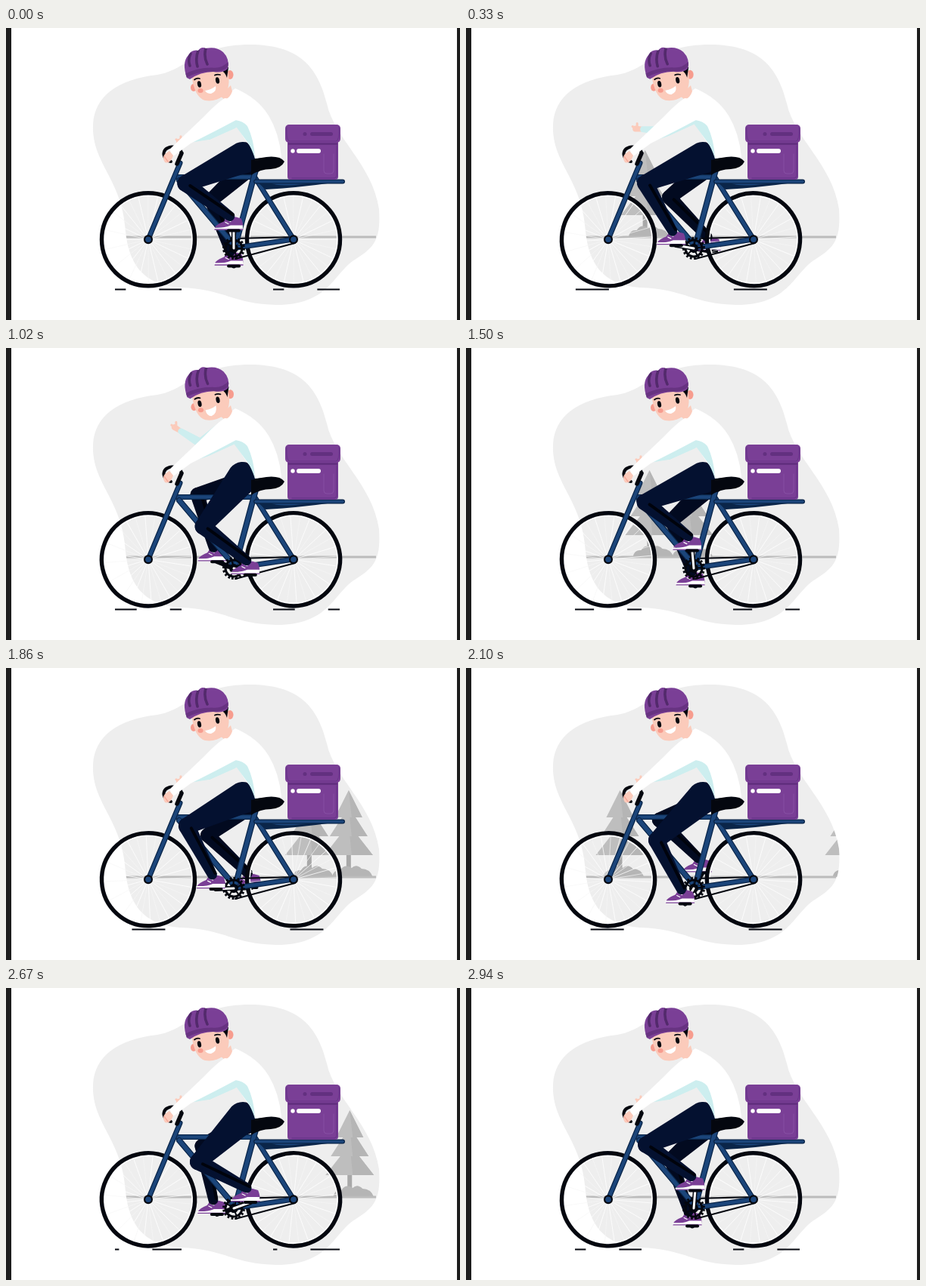
An HTML page with a canvas for the animation above (2.97 s loop, 600x387 px).

```html
<!DOCTYPE html>
<html lang="en">
<head>
<meta charset="utf-8">
<title>Delivery cyclist</title>
<style>
html, body { margin: 0; width: 100%; height: 100%; overflow: hidden; background: #fff; }
canvas { display: block; }
</style>
</head>
<body>
<canvas id="stage" width="600" height="387"></canvas>
<script>
const c = document.getElementById('stage').getContext('2d');
const LOOP = 2970, TURN = 1480, TAU = Math.PI * 2;
const INK = '#04070f', NAVY = '#0a2549', BLUE = '#1b457a', PURPLE = '#7a3f96', PLUM = '#532a6c';
const SKIN = '#fbcbbb', CORAL = '#f79c8e', MINT = '#cdeeef', NEAR = '#041130', FAR = '#020a20', SHADE = '#00030c';
const CRANK = { x: 301, y: 292 }, AXLE = 280.3;
const blob = new Path2D('M115 128C117 90 148 68 200 62C238 56 252 22 322 22C388 22 412 52 424 100' +
  'C434 147 484 180 493 240C496 285 484 292 458 309C432 328 425 367 358 367' +
  'C300 366 290 346 230 344C175 340 162 305 158 270C154 200 113 180 115 128Z');

const mix = (a, b, k) => a + (b - a) * k;
const mixPt = (a, b, k) => ({ x: mix(a.x, b.x, k), y: mix(a.y, b.y, k) });
const smooth = (a, b, t) => {
  const k = Math.min(1, Math.max(0, (t - a) / (b - a)));
  return k * k * (3 - 2 * k);
};

function shape(d, color) {
  c.fillStyle = color;
  c.fill(new Path2D(d));
}
function stroke(d, color, width, cap = 'round') {
  c.strokeStyle = color;
  c.lineWidth = width;
  c.lineCap = cap;
  c.lineJoin = 'round';
  c.stroke(new Path2D(d));
}
function oval(x, y, rx, ry, color, turn = 0) {
  c.fillStyle = color;
  c.beginPath();
  c.ellipse(x, y, rx, ry, turn, 0, TAU);
  c.fill();
}
function box(x, y, w, h, r, color) {
  c.fillStyle = color;
  c.beginPath();
  c.roundRect(x, y, w, h, r);
  c.fill();
}
function tube(d, width) {
  stroke(d, NAVY, width);
  stroke(d, BLUE, width - 2.5);
}
// Tapered capsule between two joints
function limb(a, b, ra, rb, color) {
  const t = Math.atan2(b.y - a.y, b.x - a.x);
  c.fillStyle = color;
  c.beginPath();
  c.arc(a.x, a.y, ra, t + Math.PI / 2, t - Math.PI / 2);
  c.arc(b.x, b.y, rb, t - Math.PI / 2, t + Math.PI / 2);
  c.fill();
}

function tree(x) {
  c.save();
  c.translate(x, 0);
  box(-3, 244, 6, 33, 0, '#a8a8a8');
  for (const [top, base, half] of [[207, 248, 32], [184, 223, 25], [162, 198, 18]]) {
    shape(`M0 ${top}L${half} ${base}H${-half}Z`, '#bebebe');
    shape(`M0 ${top}L${half} ${base}H4Z`, '#b5b5b5');
  }
  shape('M-22 277Q-20 267 -11 268Q-5 259 4 265Q10 259 17 266Q28 266 32 277Z', '#b5b5b5');
  c.restore();
}

function scenery(t) {
  c.fillStyle = '#eee';
  c.fill(blob);
  c.save();
  c.clip(blob);
  for (const start of [91, -418, -366, -721]) {
    const x = start + 0.44 * t;
    if (x > 90 && x < 540) tree(x);
  }
  stroke('M155 277H489', '#bcbcbc', 3, 'butt');
  c.restore();

  const shift = (58 + t / 245 * 88) % 88;
  for (const left of [144, 353]) {
    c.save();
    c.beginPath();
    c.rect(left, 340, 88, 12);
    c.clip();
    for (const x of [left + shift, left + shift - 88]) stroke(`M${x} 346.5h44`, INK, 1.8, 'butt');
    c.restore();
  }
}

function wheel(x, turn) {
  c.save();
  c.translate(x, AXLE);
  c.rotate(-turn);
  for (let i = 0; i < 28; i++) {
    c.rotate(TAU / 28);
    stroke('M7 0H57', i % 2 ? '#ffffffd0' : '#f6f6f6b0', 0.9);
  }
  c.lineWidth = 2;
  c.strokeStyle = '#fff';
  c.beginPath();
  c.arc(0, 0, 58, 0, TAU);
  c.stroke();
  c.lineWidth = 5.4;
  c.strokeStyle = INK;
  c.beginPath();
  c.arc(0, 0, 61.5, 0, TAU);
  c.stroke();
  c.restore();
}

function pedalAt(turn) {
  return { x: CRANK.x - 23.5 * Math.sin(turn), y: CRANK.y - 23.5 * Math.cos(turn) };
}

function leg(pedal, hip, near) {
  const ankle = { x: pedal.x - 5, y: pedal.y - 19 };
  const dx = ankle.x - hip.x, dy = ankle.y - hip.y, d = Math.hypot(dx, dy);
  const thigh = 83, shin = 73;
  const along = (thigh * thigh - shin * shin + d * d) / (2 * d);
  const out = Math.sqrt(Math.max(0, thigh * thigh - along * along));
  const knee = {
    x: hip.x + (dx * along - dy * out) / d,
    y: hip.y + (dy * along + dx * out) / d
  };
  const color = near ? NEAR : FAR;
  c.save();
  c.translate(pedal.x, pedal.y);
  shape('M-25 -4Q-23 -8 -13 -12L-9 -18H3L10 -16Q13 -9 12 -4H-25Z', PURPLE);
  shape('M-26 -4Q-14 -3 -4 -7L12 -7L12 -1H-24Q-27 -1 -26 -4Z', '#fff');
  stroke('M-25 -1.5H12', PURPLE, 1.3);
  stroke('M-11 -11l4 2m-1 -5l4 2', '#fff', 1.2);
  box(-9, -2, 18, 4, 2, INK);
  c.restore();
  limb(knee, ankle, near ? 11 : 9.5, 6.5, color);
  limb(hip, knee, near ? 21 : 15, near ? 11 : 9.5, color);
  stroke(`M${knee.x + 6} ${knee.y + 3}L${ankle.x + 4} ${ankle.y - 2}`, SHADE, 4);
}

function crankArm(p, near) {
  const d = `M${CRANK.x} ${CRANK.y}L${p.x} ${p.y}`;
  stroke(d, INK, 6);
  if (near) stroke(d, '#fff', 3);
}

function bike(turn) {
  wheel(188, turn);
  wheel(380, turn);
  stroke('M303 279L381 277M303 306L382 285', INK, 2);
  tube('M305 291L380 280', 7);
  tube('M329 198L380 280', 7);
  tube('M226 197.5H328', 7);
  tube('M229 202L299 285', 8);
  tube('M333 177L304 285', 8);
  tube('M230 179L188 280', 7);
  for (const x of [188, 380]) {
    oval(x, AXLE, 6, 6, INK);
    oval(x, AXLE, 3.8, 3.8, BLUE);
  }
  shape('M331 203L343 214Q390 211 425 206Z', NAVY);
  shape('M349 205Q360 211 390 207L412 204Z', BLUE);
  tube('M330 203.5L445 203.5', 6);
  stroke('M226 180L232 166', INK, 5.5);
  stroke('M232 166Q231 157 219 157.5Q208 159 208.5 168Q210 176 218 177', INK, 4);
}

function parcel() {
  box(372, 148, 67, 53, 4, PURPLE);
  box(373, 151, 65, 4, 0, '#633080');
  stroke('M437 156V195Q437 199 433 199H378', '#69358a', 1.5);
  stroke('M420 167V189Q420 193 424 193H429Q433 193 433 189V167', '#8a52a5', 0.9);
  box(369, 128, 73, 24, 5, PURPLE);
  stroke('M371 131Q370 149 375 150H436Q441 149 440 131', '#69358a', 1.2);
  box(402, 138, 30, 5, 2.5, '#633080');
  oval(395, 140.5, 2.5, 2.5, '#633080');
  box(384, 160, 32, 6, 3, '#fff');
  oval(379, 163, 2.7, 2.7, '#fff');
}

function chainring(turn) {
  c.save();
  c.translate(CRANK.x, CRANK.y);
  c.rotate(-turn);
  c.strokeStyle = INK;
  c.lineCap = 'butt';
  for (const [r, w, dash] of [[13.5, 3, [2.7, 2.6]], [11, 3, []], [4.5, 3, []]]) {
    c.setLineDash(dash);
    c.lineWidth = w;
    c.beginPath();
    c.arc(0, 0, r, 0, TAU);
    c.stroke();
  }
  c.setLineDash([]);
  for (let i = 0; i < 5; i++) {
    c.rotate(TAU / 5);
    stroke('M5 0H11', INK, 2);
  }
  c.restore();
}

function farArm(t, wave) {
  const shoulder = mixPt({ x: 299, y: 126 }, { x: 284, y: 107 }, wave);
  const elbow = mixPt({ x: 268, y: 142 }, { x: 257, y: 126 }, wave);
  const swing = 0.59 + 0.14 * Math.sin(TAU * (t - 658) / 660);
  const lift = mix(-0.22, swing, wave);
  const hand = { x: elbow.x - 40 * Math.cos(lift), y: elbow.y - 40 * Math.sin(lift) };
  const cuff = mixPt(elbow, hand, 0.75);
  limb(cuff, hand, 3.2, 4, SKIN);
  stroke(`M${hand.x} ${hand.y}l-4 -3m6 1l0 -5`, SKIN, 3);
  limb(shoulder, elbow, 8, 6, MINT);
  limb(elbow, cuff, 6, 4, MINT);
}

function torso() {
  shape('M290 92Q297 84 303 80Q333 93 347 116Q361 139 364 171L329 173Q327 160 318 151L300 123L274 116Z', '#fff');
  shape('M303 122Q313 123 319 130Q328 148 329 173Q325 160 319 151L302 128Z', MINT);
  shape('M283 90L297 76L299 84Q296 93 289 95Z', SKIN);
}

function nearArm() {
  shape('M303 121L244 151L268 143L303 127Z', MINT);
  shape('M289 93Q279 99 262 117L216 161L221 170L244 153Q276 137 304 122L311 95Z', '#fff');
  shape('M216 163L221 169Q217 181 210 178Q206 172 210 167Z', SKIN);
  stroke('M209 170l5 7', CORAL, 1.2);
}

function head(wave) {
  c.save();
  c.translate(wave * 0.5, -wave * 0.7);
  oval(296, 62, 4.5, 6, CORAL);
  oval(248, 79, 4, 5, CORAL);
  shape('M245 62Q267 48 293 56Q298 80 287 90Q277 98 263 96Q249 92 245 62Z', SKIN);
  shape('M287 54L294 52L292 66Q290 60 287 58Z', INK);
  stroke('M249 68.5Q252 66 256 67M276 62.5Q279 61 283 62', INK, 1.8);
  oval(255.5, 74.5, 2.5, 4.3, INK, -0.2);
  oval(279.5, 69.5, 2.5, 4.3, INK, -0.2);
  oval(257, 83, 3.6, 3, CORAL);
  const dip = mix(87, 91, wave);
  shape(`M263 83Q271 82 277 77Q279 ${dip - 3} 271 ${dip}Q265 ${dip} 263 83Z`, '#fff');

  const helmet = new Path2D('M239 66Q232 46 241 36Q246 28 254 30Q258 24 264 27Q278 24 287 32' +
    'Q296 41 293 54Q287 60 274 58Q257 58 243 68Z');
  c.fillStyle = PURPLE;
  c.fill(helmet);
  c.save();
  c.clip(helmet);
  stroke('M236 64Q252 55 272 55Q286 57 296 46', '#673381', 5);
  stroke('M244 34Q240 42 243 50M254 30Q250 40 253 51M264 27Q261 38 266 48', PLUM, 3.6);
  c.restore();
  c.restore();
}

function draw(now) {
  const t = now % LOOP;
  const turn = t / TURN * TAU;
  const wave = smooth(230, 480, t) * (1 - smooth(1110, 1360, t));
  const near = pedalAt(turn), far = pedalAt(turn + Math.PI);

  c.fillStyle = '#fff';
  c.fillRect(0, 0, 600, 387);
  scenery(t);
  farArm(t, wave);
  crankArm(far, false);
  leg(far, { x: 333, y: 172 }, false);
  bike(turn);
  parcel();
  chainring(turn);
  crankArm(near, true);
  leg(near, { x: 313, y: 172 }, true);
  torso();
  shape('M324 175Q335 172 344 171Q362 169 368 177Q364 186 350 187Q336 187 324 195Z', INK);
  nearArm();
  head(wave);
  c.fillStyle = '#1d1d1d';
  c.fillRect(0, 0, 7, 387);
  c.fillRect(596, 0, 4, 387);
}

const begin = performance.now();
function frame() {
  draw(performance.now() - begin);
  requestAnimationFrame(frame);
}
frame();
</script>
</body>
</html>
```
